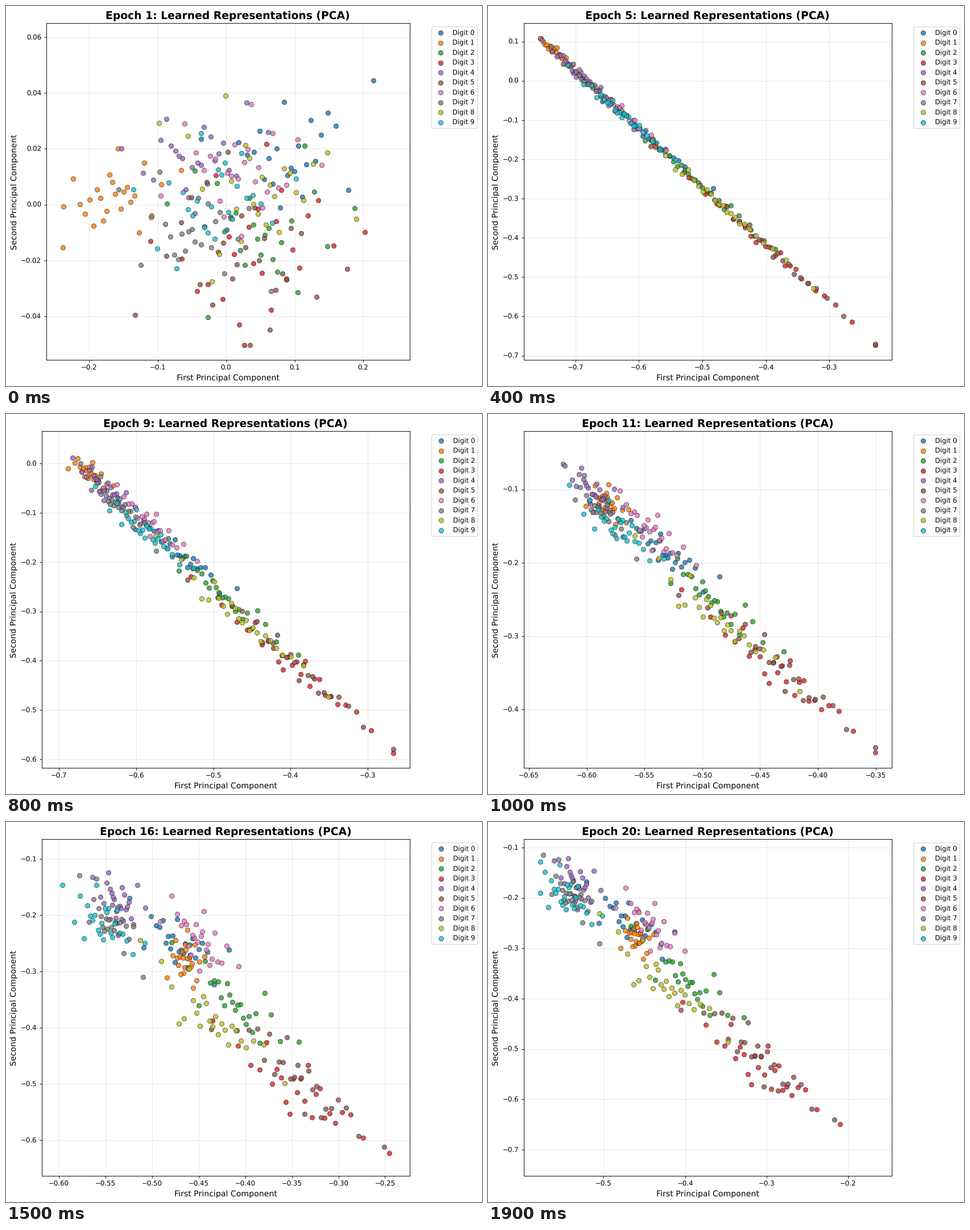
A matplotlib script that plays this animation: 837 by 669 pixels, repeating every 2 s.

```python
import numpy as np
import matplotlib.pyplot as plt
from matplotlib.animation import FuncAnimation

W, H, DPI = 837, 669, 84.6
EPOCHS, STEP_MS = 20, 100
PER_DIGIT = 25

plt.rcParams.update({"font.family": "DejaVu Sans", "text.hinting": "none"})

# Key epochs: data range x0, x1, y0, y1, looseness of the band, and a power
# that packs the digits towards its upper end.
KEYS = {
    1: (-.2386, .2439, -.0503, .0595, .2, 1.1),
    3: (-.7490, -.2720, -.6300, .1040, .15, 1.1),
    7: (-.7620, -.1840, -.7150, .1110, .25, 1),
    11: (-.6402, -.3505, -.4590, -.0419, .7, .9),
    13: (-.6040, -.0324, -.9042, -.1044, .4, 1.25),
    16: (-.6006, -.2414, -.6369, -.0923, 1.1, .87),
    20: (-.5775, -.1671, -.7220, -.1140, .9, 1.12),
}

# Digit centres as shares of the data range, measured from the upper left:
# the first cloud, the place along the thin line, and the final cluster.
CLOUD_X = np.array([.68, .15, .60, .59, .40, .54, .54, .40, .59, .46])
CLOUD_Y = np.array([.38, .52, .63, .69, .39, .71, .43, .63, .49, .53])
LINE = np.array([.34, .05, .47, .70, .12, .68, .24, .17, .55, .26])
LATE_X = np.array([.31, .33, .48, .69, .14, .68, .37, .12, .41, .10])
LATE_Y = np.array([.25, .30, .44, .73, .12, .69, .25, .17, .47, .17])

SPREAD = .02 + .16 * LINE

# Evenly stratified bell-shaped scores, shuffled per digit and direction
rng = np.random.default_rng(12)
p = (np.arange(PER_DIGIT) + .5) / PER_DIGIT
bell = np.log(p / (1 - p)) / 1.75
along, across = np.array([[rng.permutation(bell) for _ in range(10)]
                          for _ in range(2)])


def smooth(t):
    t = np.clip(t, 0, 1)
    return t * t * (3 - 2 * t)


def blend(a, b, t):
    return a + (b - a) * t


def column(values):
    return np.asarray(values)[:, None]


def settings(epoch):
    return [np.interp(epoch, list(KEYS), col) for col in zip(*KEYS.values())]


def cloud():
    """The loose first cloud."""
    x = column(CLOUD_X) + column(.08 + .5 * SPREAD) * along
    y = column(CLOUD_Y) + column(.05 + .8 * SPREAD) * across
    return x, y


def band(epoch, loose, power):
    """Digits strung along the falling diagonal, drifting into clusters."""
    centre = blend(LINE, LATE_X, smooth((epoch - 7) / 9)) ** power
    side = (LATE_Y - LATE_X) * loose ** 2
    step = column(SPREAD * (1.3 - .025 * epoch)) * along
    x = column(centre) + step
    y = column(centre + side) + (1 - .15 * loose) * step + .042 * loose * across
    return x, y


def points(epoch, loose, power):
    t = min((epoch - 1) / 2, 1)
    return [np.clip(blend(a, b, t), 0, 1)
            for a, b in zip(cloud(), band(epoch, loose, power))]


def padded(lo, hi):
    pad = .05 * (hi - lo)
    return lo - pad, hi + pad


def box(left, right=710, top=30.5, bottom=623.5):
    return [left / W, 1 - bottom / H, (right - left) / W, (bottom - top) / H]


fig = plt.figure(figsize=((W + .01) / DPI, (H + .01) / DPI), dpi=DPI,
                 facecolor="white")
ax = fig.add_axes(box(70.5))
dots = [ax.scatter([], [], s=50, color=f"C{d}", alpha=.8, edgecolors="black",
                   linewidths=.5, label=f"Digit {d}")
        for d in range(10)]
ax.set_xlabel("First Principal Component", fontsize=12)
ax.set_ylabel("Second Principal Component", fontsize=12)
title = ax.set_title("", fontsize=16, fontweight="bold")
ax.grid(True, alpha=.3)
ax.legend(bbox_to_anchor=(1.05, 1), loc="upper left")


def draw(frame):
    epoch = frame + 1
    x0, x1, y0, y1, loose, power = settings(epoch)
    ax.set_position(box(70.5 if epoch == 1 else 62.5))
    ax.set_xlim(padded(x0, x1))
    ax.set_ylim(padded(y0, y1))
    title.set_text(f"Epoch {epoch}: Learned Representations (PCA)")
    xs, ys = points(epoch, loose, power)
    for dot, x, y in zip(dots, blend(x0, x1, xs), blend(y1, y0, ys)):
        dot.set_offsets(np.column_stack([x, y]))
    return dots


anim = FuncAnimation(fig, draw, frames=EPOCHS, init_func=lambda: draw(0),
                     interval=STEP_MS, repeat=True, repeat_delay=0, blit=False)
plt.show()
```
